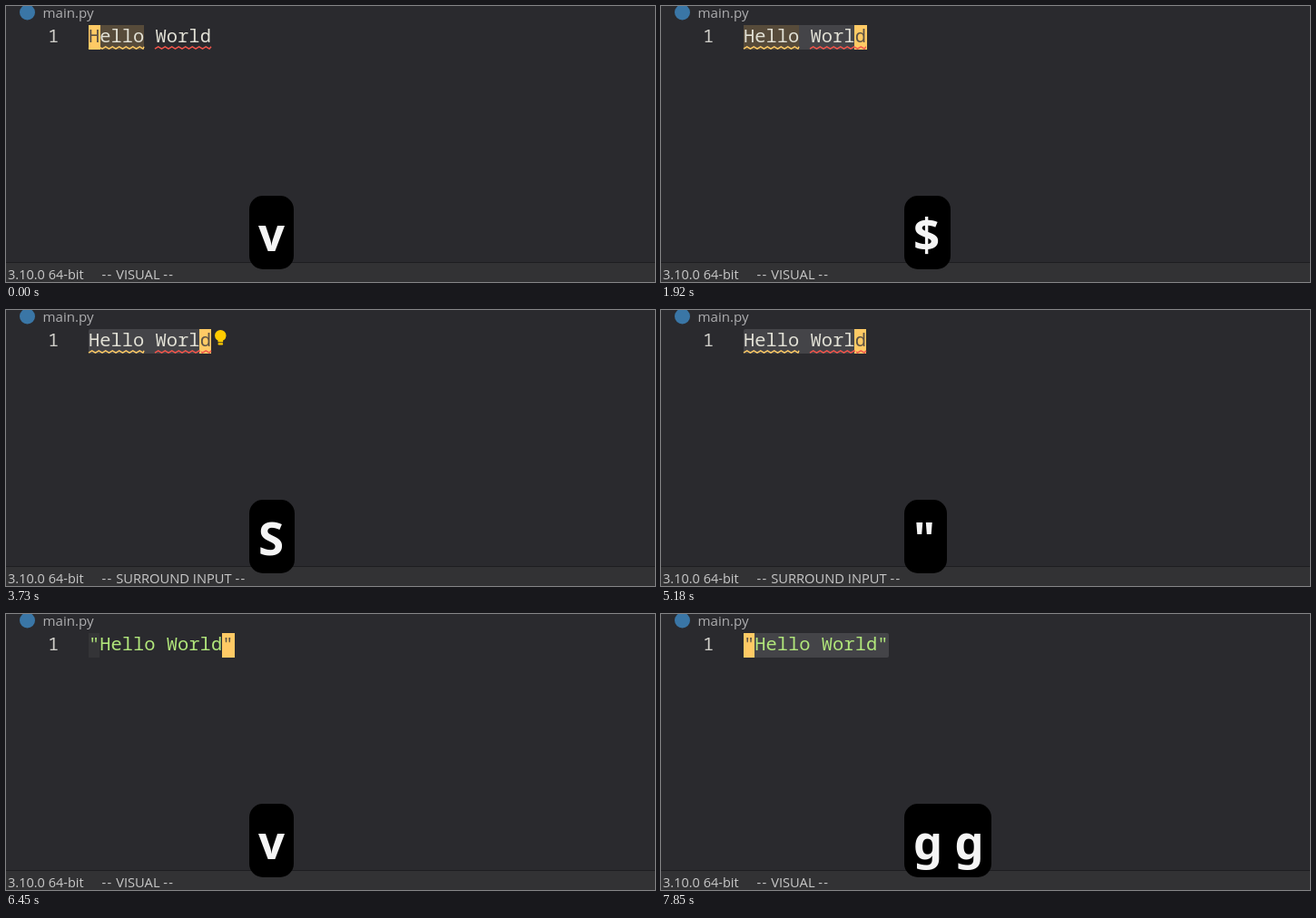
These frames come from a looping animation (715 px wide and 304 px high, 8 s). An HTML page:

```html
<!DOCTYPE html>
<html lang="en">
<head>
<meta charset="utf-8">
<title>Editor surround demo</title>
<style>
  html, body { margin: 0; width: 100%; height: 100%; overflow: hidden; background: #2a2a2e; }
  svg { display: block; }
  text { white-space: pre; }
  .ui { font-family: "Open Sans", "Noto Sans", sans-serif; }
  .code { font: 500 20.45px "Noto Sans Mono", "DejaVu Sans Mono", monospace; }
  .key { font: 800 51px "Noto Sans", "Open Sans", sans-serif; fill: #f5f5f5; }
  .dash { letter-spacing: 1.2px; }
</style>
</head>
<body>
<svg id="stage" width="715" height="304" viewBox="0 0 715 304">
  <rect width="715" height="304" fill="#2a2a2e"/>
  <circle cx="23.5" cy="7" r="8.5" fill="#3a76a6"/>
  <text class="ui" x="40.5" y="13" font-size="15.1" fill="#aeaeb0">main.py</text>
  <text class="code" x="46" y="40" fill="#cfcec9">1</text>
  <rect y="282" width="715" height="22" fill="#323234"/>
  <rect y="282" width="715" height="1" fill="#1d1d20"/>
  <text class="ui" x="2" y="301" font-size="14.5" fill="#c8c8c8">3.10.0 64-bit</text>
  <g id="status"></g>
  <g id="editor"></g>
  <g id="badge"></g>
</svg>
<script>
const LOOP = 8000;
const YELLOW = '#ffca65', RED = '#f3554b', GREEN = '#b1e67b', PLAIN = '#e2e1d6', DARK = '#5c5245';
const TOP = 21, ROW = 27, LEFT = 91, CHAR = 12.28;

const KEY_WIDTHS = { v: 49, l: 36, 'l l': 63, $: 51, S: 50, '"': 47, g: 53, 'g g': 96 };

// Each event changes only the listed parts of the state.
const EVENTS = [
  [0, { key: 'v', mode: 'VISUAL', text: 'Hello World', color: PLAIN, cursor: 0, block: true,
        caret: 1, selection: null, word: [0, 5], squiggles: 0, bulb: false, line: false, match: false }],
  [120, { caret: null }],
  [600, { caret: 1 }],
  [1130, { key: 'l', cursor: 1, caret: 2, selection: [0, 1], word: null }],
  [1390, { word: [0, 5] }],
  [1650, { caret: null }],
  [1920, { key: '$', cursor: 10, caret: 11, selection: [0, 11] }],
  [1990, { word: null }],
  [2190, { bulb: true }],
  [2450, { caret: null }],
  [2930, { caret: 11 }],
  [3460, { caret: null }],
  [3730, { key: 'S', mode: 'SURROUND INPUT', caret: 10 }],
  [4000, { bulb: false }],
  [4260, { caret: null }],
  [4720, { caret: 10 }],
  [5180, { key: '"' }],
  [5250, { mode: 'NORMAL', text: '"Hello World"', caret: null, selection: null, squiggles: 1, line: true }],
  [5320, { color: GREEN }],
  [5580, { squiggles: null }],
  [5780, { block: false }],
  [6240, { key: 'l', cursor: 11, block: true }],
  [6310, { key: 'l l', cursor: 12 }],
  [6380, { match: true }],
  [6450, { key: 'v', mode: 'VISUAL', caret: 13, line: false }],
  [6650, { caret: null }],
  [7180, { caret: 13 }],
  [7510, { key: 'g' }],
  [7710, { caret: null }],
  [7850, { key: 'g g', cursor: 0, caret: null, selection: [0, 13], match: false }]
];

const byId = id => document.getElementById(id);
const colX = col => LEFT + col * CHAR;
const rect = (x, y, w, h, fill, rx = 0) =>
  `<rect x="${x}" y="${y}" width="${w}" height="${h}" rx="${rx}" fill="${fill}"/>`;

function cells(from, to, fill, rx) {
  const x = Math.floor(colX(from));
  return rect(x, TOP, Math.round(colX(to)) - x, ROW, fill, rx);
}

function squiggle(from, to, color) {
  const end = Math.round(colX(to));
  let x = Math.floor(colX(from)), d = `M${x} 47.2`;
  for (let up = true; x < end; up = !up) {
    x = Math.min(x + 3.75, end);
    d += `L${x} ${up ? 44.8 : 47.2}`;
  }
  return `<path d="${d}" fill="none" stroke="${color}" stroke-width="1.4" stroke-linejoin="round"/>`;
}

function codeText({ text, color, cursor, block }) {
  const span = (part, fill) => part && `<tspan fill="${fill}">${part}</tspan>`;
  return `<text class="code" x="${LEFT}" y="40">` +
    span(text.slice(0, cursor), color) +
    span(text[cursor], block ? DARK : color) +
    span(text.slice(cursor + 1), color) + '</text>';
}

const BULB = '<circle cx="236.3" cy="28.2" r="6.2" fill="#ffcc00"/>' +
  rect(233.5, 31, 5.6, 4.4, '#ffcc00') + rect(233.5, 36.2, 5.6, 2.4, '#ffcc00', 1);

function editor(s) {
  let out = '';
  if (s.line) out += rect(LEFT, TOP, 715 - LEFT, ROW, '#39373b');
  if (s.selection) out += cells(...s.selection, '#444448', 2);
  if (s.word) out += cells(...s.word, '#574b3a');
  if (s.match) out += cells(0, 1, '#343437');
  if (s.block) out += cells(s.cursor, s.cursor + 1, YELLOW);
  out += codeText(s);
  if (s.squiggles !== null) {
    const shift = s.squiggles;
    out += squiggle(shift, shift + 5, YELLOW) + squiggle(shift + 6, shift + 11, RED);
  }
  if (s.caret !== null) out += rect(Math.round(colX(s.caret)), TOP, 1, ROW, YELLOW);
  return s.bulb ? out + BULB : out;
}

function status(mode) {
  const dash = '<tspan class="dash">--</tspan>';
  return `<text class="ui" x="105.5" y="301" font-size="14.7" fill="#c8c8c8">${dash} ${mode} ${dash}</text>`;
}

function badge(key) {
  return rect(268, 209, KEY_WIDTHS[key], 81, '#000', 15) +
    `<text class="key" x="278" y="270">${key}</text>`;
}

let shown = -1;
function draw(time) {
  const count = EVENTS.filter(([at]) => at <= time).length;
  if (count === shown) return;
  shown = count;
  const state = Object.assign({}, ...EVENTS.slice(0, count).map(([, change]) => change));
  byId('status').innerHTML = status(state.mode);
  byId('editor').innerHTML = editor(state);
  byId('badge').innerHTML = badge(state.key);
}

const start = performance.now();
function tick() {
  draw((performance.now() - start) % LOOP);
  requestAnimationFrame(tick);
}
tick();
</script>
</body>
</html>
```
